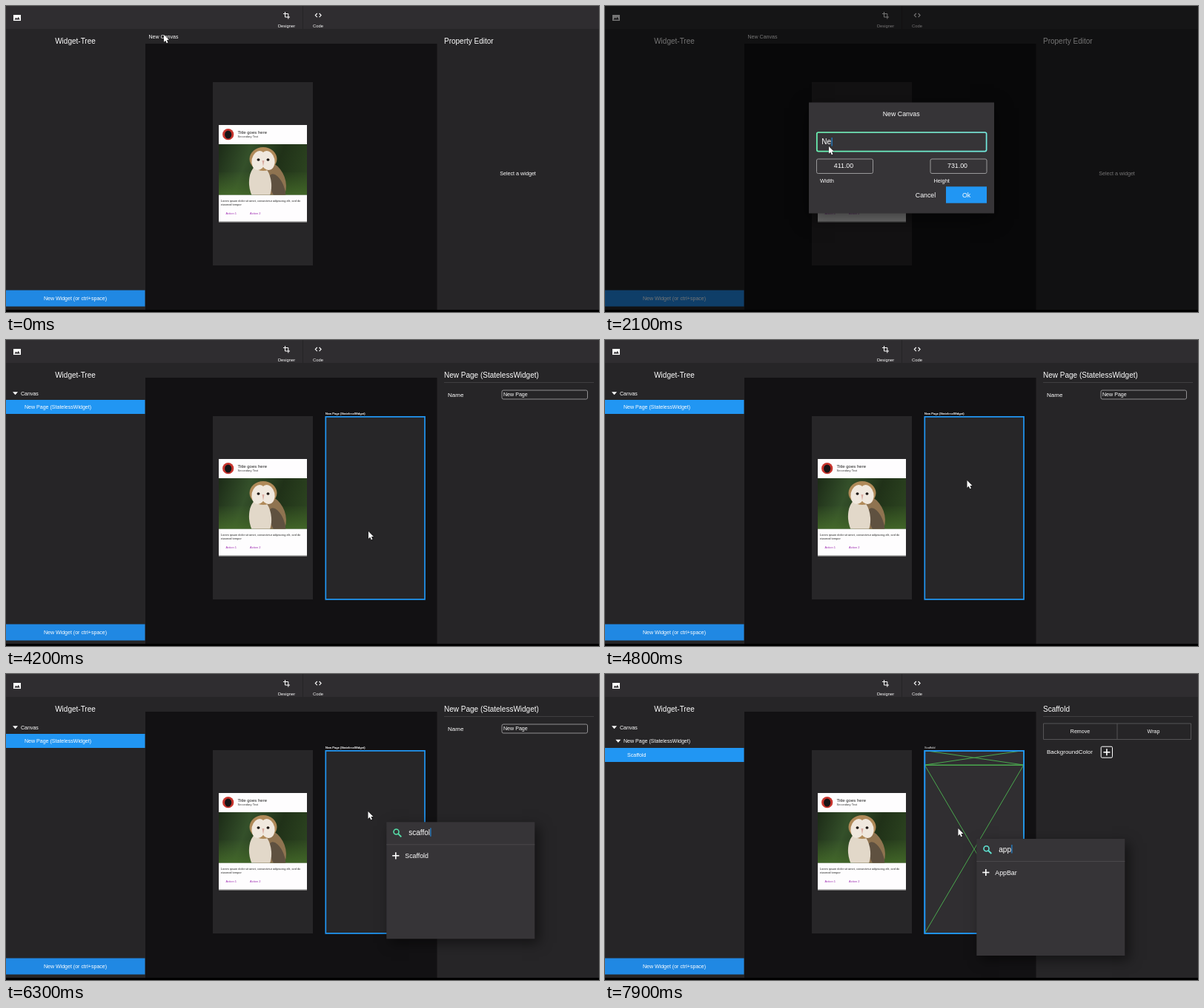
Write an HTML page with a canvas that moves like this. It is 800 by 414 pixels and loops after 8000 ms.

```html
<!DOCTYPE html>
<html lang="en">
<head>
<meta charset="utf-8">
<title>Widget designer</title>
<style>
html, body { margin: 0; width: 100%; height: 100%; overflow: hidden; background: #000; }
canvas { display: block; }
</style>
</head>
<body>
<canvas id="stage" width="800" height="414"></canvas>
<script>
const c = document.getElementById('stage').getContext('2d');
const LOOP = 8000, STEP = 100;
const BLUE = '#2196f3', PANEL = '#262527', WHITE = '#fff';

// [time, x, y] stops of the pointer
const POINTER = [
  [0, 213, 39], [700, 213, 39], [1600, 302, 190], [3100, 302, 190],
  [3600, 484, 268], [4000, 488, 258], [4200, 489, 259], [4900, 488.5, 186],
  [6600, 488.5, 186], [7100, 476.5, 209], [LOOP, 476.5, 209]
];
const NAME_KEYS = [2000, 2100, 2200, 2400, 2500, 2600, 2700, 2800];
const SCAFFOLD_KEYS = [5300, 5400, 5500, 5700, 6000, 6200, 6300, 6500];
const APP_KEYS = [7600, 7700, 7800];

const clamp = v => Math.max(0, Math.min(1, v));
const typed = (word, keys, t) => word.slice(0, keys.filter(k => k <= t).length);

function rect(x, y, w, h, color) {
  c.fillStyle = color;
  c.fillRect(x, y, w, h);
}

function box(x, y, w, h, color, width = 1, r = 0) {
  c.strokeStyle = color;
  c.lineWidth = width;
  c.beginPath();
  c.roundRect(x, y, w, h, r);
  c.stroke();
}

function line(color, width, ...p) {
  c.strokeStyle = color;
  c.lineWidth = width;
  c.beginPath();
  for (let i = 0; i < p.length; i += 2) c.lineTo(p[i], p[i + 1]);
  c.stroke();
}

function poly(color, ...p) {
  c.fillStyle = color;
  c.beginPath();
  for (let i = 0; i < p.length; i += 2) c.lineTo(p[i], p[i + 1]);
  c.closePath();
  c.fill();
}

function oval(x, y, rx, ry, color, turn = 0) {
  c.fillStyle = color;
  c.beginPath();
  c.ellipse(x, y, rx, ry, turn, 0, 7);
  c.fill();
}

// y is the vertical middle of the capitals
function text(s, x, y, size, align = 'left', color = WHITE, weight = '') {
  c.font = `${weight} ${size}px "Liberation Sans", Arial, sans-serif`;
  c.textAlign = align;
  c.fillStyle = color;
  c.fillText(s, x, y + size * 0.36);
  return c.measureText(s).width;
}

function gradient(x0, y0, x1, y1, ...colors) {
  const g = c.createLinearGradient(x0, y0, x1, y1);
  colors.forEach((color, i) => g.addColorStop(i / (colors.length - 1), color));
  return g;
}

function shadow(blur, dx = 0, dy = 0) {
  c.shadowColor = blur ? 'rgba(0,0,0,.5)' : 'transparent';
  c.shadowBlur = blur;
  c.shadowOffsetX = dx;
  c.shadowOffsetY = dy;
}

function plus(x, y, r) {
  line(WHITE, 1.6, x - r, y, x + r, y);
  line(WHITE, 1.6, x, y - r, x, y + r);
}

function crossBox(x, y, w, h) {
  const green = '#4aa84e';
  box(x, y, w, h, green);
  line(green, 1, x, y, x + w, y + h);
  line(green, 1, x + w, y, x, y + h);
}

function topBar() {
  rect(0, 0, 800, 31, '#2f2d30');
  line('#252426', 1, 400.5, 0, 400.5, 31);
  rect(10, 12, 10, 8, WHITE);
  poly('#2f2d30', 11.3, 18.4, 13.5, 15.6, 15, 17.2, 16.7, 14.8, 18.8, 18.4);
  line(WHITE, 1, 376.5, 8, 376.5, 15, 383, 15);
  line(WHITE, 1, 374, 10.5, 380.8, 10.5, 380.8, 17.5);
  line(WHITE, 1.1, 419.8, 10, 417.3, 12.6, 419.8, 15.2);
  line(WHITE, 1.1, 422.6, 10, 425.1, 12.6, 422.6, 15.2);
  text('Designer', 378.5, 27, 5.8, 'center');
  text('Code', 421, 27, 5.8, 'center');
}

function owlPhoto() {
  c.save();
  c.beginPath();
  c.rect(287, 187, 119, 68.5);
  c.clip();
  rect(287, 187, 119, 69, gradient(287, 187, 406, 230, '#1c2b17', '#34502a', '#203118', '#2c4420'));
  rect(287, 225, 119, 31, gradient(0, 222, 0, 256, 'rgba(72,112,42,0)', 'rgba(72,112,42,.75)'));
  oval(354, 239, 23, 30, '#8f7350', -0.35);
  oval(366, 246, 9, 20, '#5f5140', -0.4);
  oval(343, 241, 15, 26, '#e2d8c9', -0.08);
  oval(347, 207, 18.5, 16, '#b08a59');
  oval(341, 209, 9.5, 13, '#f0e8de', 0.2);
  oval(353, 209, 9.5, 13, '#f0e8de', -0.2);
  oval(340.5, 208, 2, 1.7, '#1c1512');
  oval(353.5, 208, 2, 1.7, '#1c1512');
  poly('#d9aaa0', 345.5, 209, 348.5, 209, 347, 217);
  c.restore();
}

function card() {
  rect(279, 103, 135, 248, '#272628');
  rect(287, 161, 119, 131, '#fefdfe');
  rect(287, 291.5, 119, 1.5, '#777');
  oval(299.7, 173.7, 7.6, 7.6, '#c8352e');
  oval(299.7, 174, 4.6, 5.6, '#171416');
  text('Title goes here', 312.5, 171.3, 6, 'left', '#222');
  text('Secondary Text', 312.5, 177, 4, 'left', '#333');
  owlPhoto();
  text('Lorem ipsum dolor sit amet, consectetur adipiscing elit, sed do', 289.8, 263.3, 3.9, 'left', '#222');
  text('eiusmod tempor', 289.8, 268.2, 3.9, 'left', '#222');
  text('Action 1', 296.5, 280.2, 4, 'left', '#9c27b0');
  text('Action 2', 329, 280.2, 4, 'left', '#9c27b0');
}

function page(scaffold) {
  rect(431, 103.5, 134, 247.5, scaffold ? '#302e31' : '#272628');
  text(scaffold ? 'Scaffold' : 'New Page (StatelessWidget)', 431, 100, 4, 'left', WHITE, scaffold ? '' : 'bold');
  box(431.3, 103.8, 133.7, 247, BLUE, 1.7);
  if (scaffold) {
    crossBox(431.5, 103.5, 133, 19.5);
    crossBox(431.5, 123.5, 133, 227);
    crossBox(539.5, 325.5, 20, 20);
    box(431.3, 103.8, 133.7, 247, BLUE, 1.7);
  }
}

function treeRow(label, level, y, selected) {
  if (selected) rect(0, y - 9.5, 187.5, 19, BLUE);
  else {
    const x = 9 + level * 5.3;
    poly(WHITE, x, y - 1.7, x + 7, y - 1.7, x + 3.5, y + 2.2);
  }
  text(label, 20 + level * 5, y, 7.05);
}

function propertyPanel(made, scaffold) {
  const title = scaffold ? 'Scaffold' : made ? 'New Page (StatelessWidget)' : 'Property Editor';
  text(title, 591, 47.5, 10);
  if (!made) {
    text('Select a widget', 690.5, 226, 7.2, 'center');
    return;
  }
  line('#3f3e40', 1, 591, 57.5, 793, 57.5);
  if (!scaffold) {
    text('Name', 596, 74.3, 8);
    box(669, 68, 115.5, 12, '#908f91', 1, 2);
    text('New Page', 671, 73.5, 7.1);
    return;
  }
  box(591.5, 67, 199, 21.5, '#555456');
  line('#555456', 1, 691, 67, 691, 88.5);
  text('Remove', 641, 77.3, 7.1, 'center');
  text('Wrap', 740, 77.3, 7.1, 'center');
  text('BackgroundColor', 596, 105.5, 8);
  box(669.2, 98.2, 15.3, 15, WHITE, 1, 1.5);
  plus(676.9, 105.8, 4.5);
}

function editor(t) {
  const made = t >= 4100, scaffold = t >= 6700;
  rect(0, 0, 800, 414, '#000');
  rect(0, 31, 800, 380, PANEL);
  rect(188, 51, 393.5, 360, '#121113');
  topBar();
  text('Widget-Tree', 93.5, 47.5, 10, 'center');
  if (made) {
    treeRow('Canvas', 0, 72, false);
    treeRow('New Page (StatelessWidget)', 1, 90.5, !scaffold);
    if (scaffold) treeRow('Scaffold', 2, 109.5, true);
  } else text('New Canvas', 192.5, 41, 7.05);
  rect(0, 384.5, 187.5, 22, '#2088e3');
  text('New Widget (or ctrl+space)', 93.5, 395.5, 7.05, 'center');
  card();
  if (made) page(scaffold);
  propertyPanel(made, scaffold);
}

function numberField(x, value, label) {
  box(x + 0.5, 207, 76, 19.5, '#99989a', 1, 2);
  text(value, x + 37, 216.3, 8.8, 'center');
  text(label, x + 5, 236, 7.4);
}

function dialog(t) {
  const show = t < 4000 ? clamp((t - 100) / 300) : clamp((4200 - t) / 200);
  if (!show) return;
  c.globalAlpha = show;
  rect(0, 0, 800, 414, 'rgba(0,0,0,.54)');
  shadow(22, 0, 7);
  rect(275, 130.5, 250, 150, '#363437');
  shadow(0);
  text('New Canvas', 399.7, 145.5, 8.8, 'center');

  const focus = clamp((t - 1600) / 300);
  box(285.8, 171, 228.8, 25.6, '#99989a', 1, 2);
  if (focus) {
    c.globalAlpha = show * focus;
    const left = t < 2500 ? '#66efae' : '#6febd0';
    box(285.8, 171, 228.8, 25.6, gradient(285, 0, 515, 0, left, '#70e8dc'), 1.7, 2);
    c.globalAlpha = show;
  }
  const w = text(typed('New Page', NAME_KEYS, t), 292.3, 183.7, 10);
  if (t >= 1700 && t < 3000) rect(292.8 + w, 178, 1, 11.5, BLUE);

  numberField(285, '411.00', 'Width');
  numberField(438.5, '731.00', 'Height');
  text('Cancel', 432.5, 255.5, 8.8, 'center');
  rect(460, 244.3, 55, 22.4, BLUE);
  text('Ok', 487.5, 255.5, 8.8, 'center');
  c.globalAlpha = 1;
}

function search(x, y, start, t, query, result, tint) {
  c.globalAlpha = t === start ? 0.6 : 1;
  shadow(16, 6, 6);
  rect(x, y, 200, 158, '#363437');
  shadow(0);
  line('#4a484b', 1, x, y + 30.5, x + 200, y + 30.5);
  c.strokeStyle = tint;
  c.lineWidth = 1.6;
  c.beginPath();
  c.arc(x + 13.2, y + 13.2, 3.5, 0, 7);
  c.stroke();
  line(tint, 1.9, x + 15.8, y + 15.8, x + 20, y + 20);
  const w = text(query, x + 30, y + 14.3, 10);
  rect(x + 30.4 + w, y + 8, 1, 11.5, BLUE);
  if (query) {
    plus(x + 12.5, y + 45.5, 4.6);
    text(result, x + 25, y + 45.5, 8.8);
  }
  c.globalAlpha = 1;
}

function pointer(t) {
  const i = POINTER.findIndex(p => p[0] > t);
  const [t0, x0, y0] = POINTER[i - 1], [t1, x1, y1] = POINTER[i];
  const k = (t - t0) / (t1 - t0), e = k * k * (3 - 2 * k);
  c.save();
  c.translate(x0 + (x1 - x0) * e, y0 + (y1 - y0) * e);
  shadow(2, 0.5, 0.5);
  poly(WHITE, 0, 0, 0, 9.8, 2.2, 7.8, 3.8, 11.2, 5.4, 10.4, 3.9, 7.1, 6.9, 7);
  c.restore();
}

function draw(now) {
  const t = Math.floor(now % LOOP / STEP) * STEP;
  editor(t);
  dialog(t);
  if (t >= 5200 && t < 6700)
    search(513.3, 200.3, 5200, t, typed('scaffold', SCAFFOLD_KEYS, t), 'Scaffold', '#56dfa9');
  if (t >= 7300)
    search(501.3, 223, 7300, t, typed('app', APP_KEYS, t), 'AppBar', '#5fe3d2');
  pointer(t);
}

const begin = performance.now();
function frame() {
  draw(performance.now() - begin);
  requestAnimationFrame(frame);
}
frame();
</script>
</body>
</html>
```
